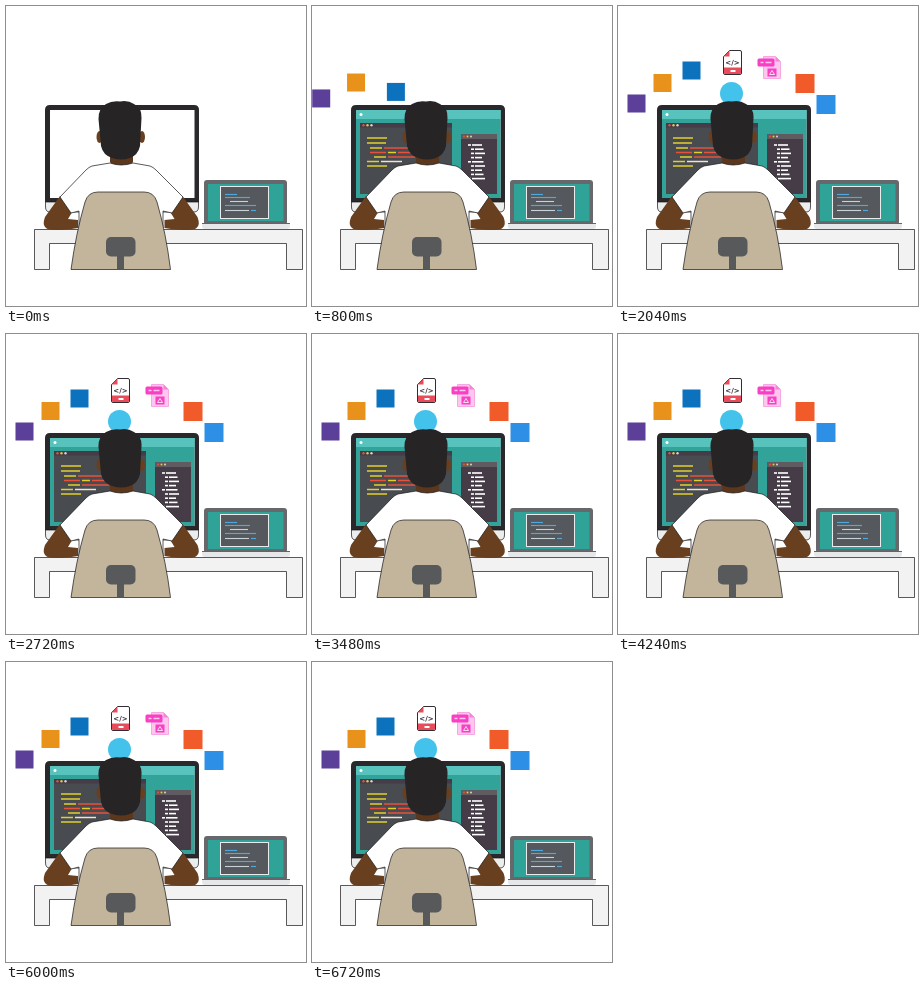
Write an HTML page that moves like this. It is 300 px wide and 300 px high and loops after 6.76 s.

```html
<!DOCTYPE html>
<html lang="en">
<head>
<meta charset="utf-8">
<title>Developer at a desk</title>
<style>
  html, body { margin: 0; width: 100%; height: 100%; overflow: hidden; background: #fff; }
  svg { display: block; width: 100vw; height: 100vh; }
  .tag { font: bold 7px "DejaVu Sans", sans-serif; text-anchor: middle; }
  .edge { stroke: #161416; stroke-width: .7; }
</style>
</head>
<body>
<svg viewBox="0 0 300 300">
  <!-- icons, in order of launch; each is drawn around its own centre -->
  <g id="icons">
    <g data-x="18.5" data-y="97.5"><rect x="-9" y="-9" width="18" height="18" fill="#5b3f98"/></g>
    <g data-x="44.5" data-y="77"><rect x="-9" y="-9" width="18" height="18" fill="#e8921c"/></g>
    <g data-x="73.5" data-y="64.5"><rect x="-9" y="-9" width="18" height="18" fill="#0d72bd"/></g>
    <g data-x="114.5" data-y="56.5">
      <path d="M-3-12H7.500Q9-12 9-10.500V10.500Q9 12 7.500 12H-7.500Q-9 12-9 10.500V-6Z" fill="#fff" stroke="#332c33"/>
      <path d="M-8.500 5H8.500V10.500Q8.500 11.500 7.500 11.500H-7.500Q-8.500 11.500-8.500 10.500Z" fill="#e84c5a"/>
      <path d="M-3-12V-6H-9Z" fill="#e84c5a"/>
      <path d="M-2 8.500H3" stroke="#fff" stroke-width="2"/>
      <text class="tag" y="2.500" fill="#332c33">&lt;/&gt;</text>
    </g>
    <g data-x="151.5" data-y="61.5">
      <path d="M-6-11H6L11-6V11H-6Z" fill="#fcc6ef" stroke="#f59ade" stroke-width=".8"/>
      <path d="M6-11V-6H11Z" fill="#f784d8"/>
      <rect x="-12" y="-9" width="17" height="8" rx="1.500" fill="#f93fc4"/>
      <path d="M-9-5H-6M-4-5H2" stroke="#fdc9f0" stroke-width="1.500"/>
      <rect x="-2" y="1" width="9" height="8" fill="#f93fc4"/>
      <path d="M2.500 3L5 7H0Z" fill="none" stroke="#fff" stroke-width=".8"/>
    </g>
    <g data-x="187" data-y="77.5"><rect x="-9.5" y="-9.5" width="19" height="19" fill="#f15a29"/></g>
    <g data-x="208" data-y="98.5"><rect x="-9.5" y="-9.5" width="19" height="19" fill="#2e8fe6"/></g>
    <g data-x="113.5" data-y="87.5"><circle r="11.500" fill="#43c3ec"/></g>
  </g>

  <!-- monitor -->
  <path d="M39 196V104Q39 99 44 99H188Q193 99 193 104V196Z" fill="#2b282c"/>
  <path class="edge" d="M39.500 196H192.500V201Q192.500 206 188 206H44Q39.500 206 39.500 201Z" fill="#eceded"/>
  <rect x="44" y="104" width="144.500" height="88" fill="#fff"/>
  <g id="screen">
    <rect x="44" y="104" width="144.500" height="88" fill="#32a399"/>
    <rect x="44" y="104" width="144.500" height="9" fill="#58c2bd"/>
    <circle cx="49" cy="108.500" r="1.500" fill="#fff"/>
    <rect x="48" y="117" width="92" height="71" fill="#484c51"/>
    <rect x="48" y="117" width="92" height="4.500" fill="#453c47"/>
    <rect x="149" y="128" width="36" height="60" fill="#453c47"/>
    <rect x="149" y="128" width="36" height="5" fill="#5f5b61"/>
    <g id="dots"></g>
    <g id="code" stroke-width="1.500"></g>
    <g id="list" stroke="#fff" stroke-width="1.600"></g>
  </g>

  <!-- desk -->
  <path class="edge" d="M28.500 223.500H296.500V263.500H280.500V237.500H43.500V263.500H28.500Z" fill="#f2f2f2"/>

  <!-- laptop -->
  <rect x="198" y="174" width="83" height="45" rx="3" fill="#66686b"/>
  <rect x="202" y="178" width="75.500" height="37" fill="#2fa398"/>
  <rect x="214.500" y="180.500" width="48" height="32" fill="#55595e" stroke="#e9ecec"/>
  <g id="notes" stroke-width="1.100"></g>
  <path d="M196 217.500H284V220Q284 223 281 223H199Q196 223 196 220Z" fill="#e6e7e8"/>
  <path d="M196 217.500H284" stroke="#636466"/>

  <!-- person -->
  <path id="arm" d="M54 190L39 211Q36 219 40 222Q45 226 72 222V214L62 213L68 203Z" fill="#69401f"/>
  <use href="#arm" transform="matrix(-1 0 0 1 230.500 0)"/>
  <path d="M104 140H127V156L121 164H110L104 156Z" fill="#5c371c"/>
  <path class="edge" d="M104 157Q115 161 127 157L144 160Q147 161 150 164L177 191L166 207L157 205V222H73V205L65 207L54 191L80 164Q83 161 86 160Z" fill="#fff"/>
  <ellipse cx="93.500" cy="131" rx="3" ry="6" fill="#69401f"/>
  <ellipse cx="136" cy="131" rx="3" ry="6" fill="#69401f"/>
  <path d="M98 131H132L127 149Q115 156 104 149Z" fill="#5c371c"/>
  <path d="M92.500 113Q92 103 100 98Q106 94.500 114 95.500Q122 94 128 98Q136 102 135.500 112L134 140Q132 149 124 152Q115 155 106 152Q97 149 95 140Z" fill="#272425"/>

  <!-- chair -->
  <path class="edge" d="M65 263.500Q70 227 79 196Q82 186 92 186H138Q148 186 151 196Q160 227 164.500 263.500Z" fill="#c3b59b"/>
  <rect x="111" y="248" width="7" height="15.500" fill="#58595b"/>
  <rect x="100" y="231" width="29.500" height="19.500" rx="5" fill="#58595b"/>
</svg>
<script>
const LOOP = 6760, FIRST = 395, STEP = 120, FLIGHT = 760;
const ORIGIN = { x: 115, y: 150 };
const byId = id => document.getElementById(id);
const clamp = v => Math.max(0, Math.min(1, v));
const backOut = p => 1 + 2.70158 * (p - 1) ** 3 + 1.70158 * (p - 1) ** 2;

function add(parent, tag, attrs) {
  const el = document.createElementNS("http://www.w3.org/2000/svg", tag);
  for (const key in attrs) el.setAttribute(key, attrs[key]);
  byId(parent).append(el);
}
const line = (parent, y, from, to, stroke) =>
  add(parent, "path", { d: `M${from} ${y}H${to}`, ...(stroke && { stroke }) });

const yellow = "#e3cf2a", red = "#e8503a", pale = "#f2e3cb", blue = "#4fa9dd", grey = "#c8d3d8";
[
  [132, 55, 75, yellow], [137, 55, 74, yellow],
  [142, 58, 70, yellow], [142, 72, 97, red],
  [146.500, 58, 74, red], [146.500, 76, 84, yellow], [146.500, 86, 100, red],
  [151, 62, 74, yellow], [151, 76, 103, red],
  [155.500, 55, 67, yellow], [155.500, 69, 90, pale],
  [160, 55, 75, yellow]
].forEach(row => line("code", ...row));

[
  [188.500, 219, 231, blue], [191.500, 219, 244, blue], [195.500, 224, 242, grey],
  [199.500, 219, 250, blue], [204.500, 219, 243, grey], [204.500, 245, 250, blue]
].forEach(row => line("notes", ...row));

for (let i = 0; i < 9; i++) {
  const y = 139 + i * 4.200, x = i % 4 ? 159 : 156;
  line("list", y, x, x + 3);
  line("list", y, x + 4, 170 + i % 3 * 1.500);
}
["#e8503a", "#e9c72e", "#d7d2d4"].forEach((fill, i) => {
  add("dots", "circle", { cx: 51.500 + i * 4, cy: 119.300, r: 1.200, fill });
  add("dots", "circle", { cx: 152 + i * 3.500, cy: 130.500, r: 1, fill });
});

const icons = [...byId("icons").children];
const start = performance.now();

function draw(now) {
  const t = Math.max(0, now - start) % LOOP;
  byId("screen").style.opacity = clamp((t - 70) / 330);
  icons.forEach((icon, i) => {
    const p = clamp((t - FIRST - i * STEP) / FLIGHT), k = backOut(p);
    const x = ORIGIN.x + (icon.dataset.x - ORIGIN.x) * k;
    const y = ORIGIN.y + (icon.dataset.y - ORIGIN.y) * k;
    icon.style.display = p > 0 ? "" : "none";
    icon.setAttribute("transform", `translate(${x} ${y})`);
  });
  requestAnimationFrame(draw);
}
draw(start);
</script>
</body>
</html>
```
